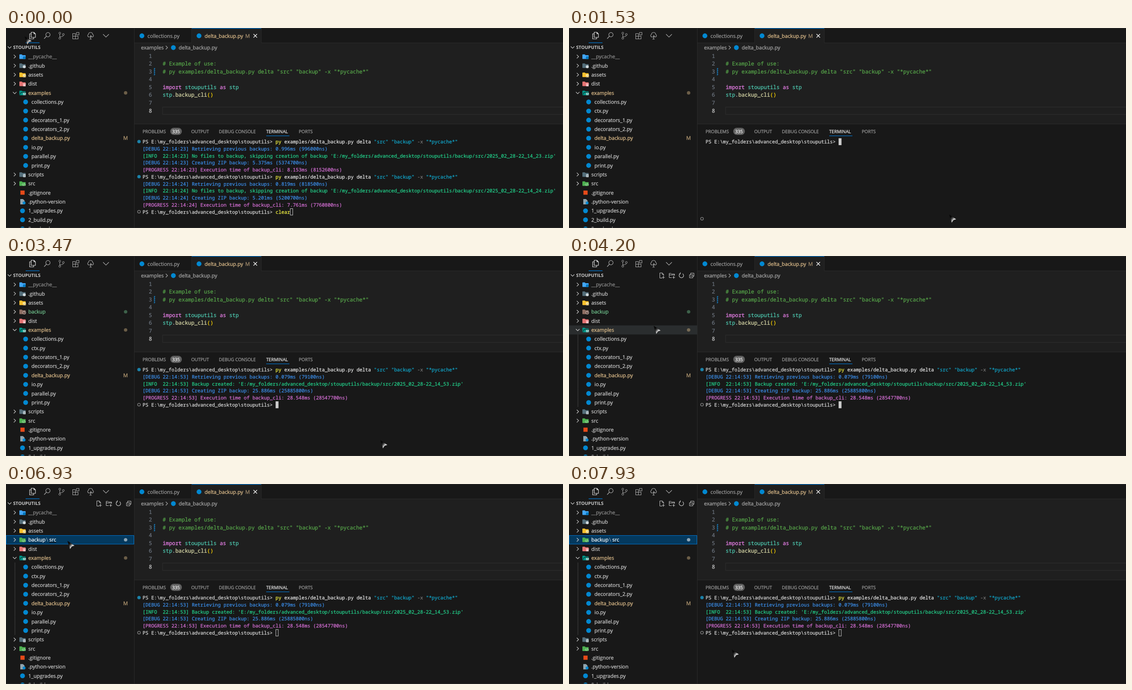
An HTML page for the animation above (8 s loop, 1248x449 px).

```html
<!DOCTYPE html>
<html lang="en">
<head>
<meta charset="utf-8">
<title>Delta backup demo</title>
<style>
  html, body { margin: 0; width: 100%; height: 100%; overflow: hidden; background: #181818; }
  svg { display: block; width: 1248px; height: 449px; }
  text { white-space: pre; text-rendering: geometricPrecision; }
  /* A hairline outline gives the small type its firm screen weight. */
  tspan { fill: currentColor; stroke: currentColor; stroke-width: .28px; }
  .ui { font: 11.43px "Open Sans", "Noto Sans", sans-serif; }
  .cap { font: 10.1px "Open Sans", "Noto Sans", sans-serif; }
  .bold { font-weight: 700; }
  .bold tspan { stroke: none; }
  .code { font: 11.85px "Noto Sans Mono", "DejaVu Sans Mono", monospace; }
  .term { font: 10.8px "Noto Sans Mono", "DejaVu Sans Mono", monospace; }
</style>
</head>
<body>
<svg viewBox="0 0 1248 449" xmlns="http://www.w3.org/2000/svg">
  <defs>
    <linearGradient id="arrow" x1="0" y1="0" x2="1" y2="1">
      <stop offset=".25" stop-color="#060606"/>
      <stop offset=".42" stop-color="#3a3a3a"/>
      <stop offset=".62" stop-color="#d8d8d8"/>
    </linearGradient>
  </defs>
  <g id="frame"></g>
  <g id="tree"></g>
  <g id="terminal"></g>
  <path id="mouse" d="M0 0L16 10.5L9.500 12.500L5.500 18.500Z" fill="url(#arrow)" stroke="#0c0c0c" stroke-width=".5"/>
</svg>
<script>
const LOOP = 8000, FPS = 15;
const ROW_H = 20.36, LINE_H = 15.75, COL_W = 6.48;
const GOLD = '#e2c08d', GREEN = '#73c991', GREY = '#9d9d9d', LIGHT = '#cccccc', LINE = '#2b2b2b', ACCENT = '#0078d4';
const el = id => document.getElementById(id);

// Drawing helpers
const rect = (x, y, w, h, fill, more = '') => `<rect x="${x}" y="${y}" width="${w}" height="${h}" fill="${fill}" ${more}/>`;
const circle = (x, y, r, fill, more = '') => `<circle cx="${x}" cy="${y}" r="${r}" fill="${fill}" ${more}/>`;
const stroke = (d, color, width = 1) => `<path d="${d}" fill="none" stroke="${color}" stroke-width="${width}"/>`;
const spans = parts => parts.map(([s, color]) => `<tspan color="${color}">${s.replace(/>/g, '&gt;')}</tspan>`).join('');
const text = (cls, x, cy, parts, more = '') =>
  `<text class="${cls}" x="${x}" y="${cy + 4}" ${more}>${spans(parts)}</text>`;
const ui = (x, cy, s, color, more) => text('ui', x, cy, [[s, color]], more);
const chevron = (x, y, open, color = LIGHT) =>
  stroke(open ? `M${x - 4} ${y - 2}l4 4l4 -4` : `M${x - 2} ${y - 4}l4 4l-4 4`, color, 1.2);

// File icons
const pyIcon = (x, y) => circle(x, y, 5.4, '#0288d1');
const folder = (y, color, badge = '') =>
  `<path d="M31 ${y - 5}h4.5l1.5 1.7h6q1 0 1 1v6.6q0 1-1 1h-12q-1 0-1-1v-8.3q0-1 1-1z" fill="${color}"/>` + badge;
const ICONS = {
  py: pyIcon,
  cache: (x, y) => folder(y, '#42a5f5', circle(41, y + 2.5, 3.2, '#0277bd')),
  hub: (x, y) => folder(y, '#546e7a', circle(41, y + 2.5, 3.3, '#cfd8dc')),
  assets: (x, y) => folder(y, '#fbc02d', rect(38, y - .5, 6.5, 6, '#fff3c4') + stroke(`M38.5 ${y + 5}l2 -3l1.5 1.5l1 -1l1.5 2.5`, '#c68a00')),
  backup: (x, y) => folder(y, '#8d6e63', circle(41, y + 2, 3.3, '#5d4037', 'stroke="#d7ccc8"') + stroke(`M41 ${y}v2h1.5`, '#d7ccc8')),
  dist: (x, y) => folder(y, '#e57373', rect(38, y - .5, 6.5, 1.8, '#ffcdd2') + rect(38.5, y + 2, 5.5, 3.5, '#ffcdd2')),
  examples: (x, y) => folder(y, '#009688', stroke(`M31 ${y + 4.5}l2.5 -5.5h10`, '#181818') + rect(38, y, 6.5, 5, '#b2dfdb') + stroke(`M39 ${y + 4}l2 -2.5l2.5 2.5`, '#00796b')),
  scripts: (x, y) => folder(y, '#546e7a', rect(38.5, y - .5, 5.5, 6.5, '#cfd8dc') + stroke(`M40 ${y + 2}h2.5m-2.5 2h2.5`, '#546e7a')),
  src: (x, y) => folder(y, '#4caf50', stroke(`M38 ${y}l-2 2.3l2 2.3m4 -4.6l2 2.3l-2 2.3m-1.2 -5l-1.6 5.5`, '#c8e6c9')),
  git: (x, y) => rect(x - 4.7, y - 4.7, 9.4, 9.4, '#e64a19'),
  version: (x, y) => `<path d="M32 ${y - 6}h6l3.5 3.5v8.5h-9.5z" fill="#90a4ae"/>` + circle(40.5, y + 2.7, 3.2, '#0288d1'),
  zip: (x, y) => rect(x - 5, y - 6, 10.5, 12, '#afb42b', 'rx="1"') + stroke(`M${x + .5} ${y - 5}v10`, '#4b4d10', 1.5)
};

function drawFrame() {
  const icon = '#a8a8a8', teal = '#4ec9b0', comment = '#57a64a', magenta = '#ee82ee';
  const numbers = Array.from({ length: 8 }, (_, i) =>
    text('code', 327, 62.5 + 17.58 * i, [[String(i + 1), i === 7 ? LIGHT : '#6e7681']], 'text-anchor="end"'));
  const code = (line, ...parts) => text('code', 351, 62.5 + 17.58 * (line - 1), parts);
  el('frame').innerHTML = [
    rect(0, 0, 1248, 449, '#181818'), rect(288, 34, 960, 181, '#1f1f1f'),
    rect(0, 0, 1248, 1, LINE), rect(287, 0, 1, 449, LINE),
    rect(288, 33, 960, 1, LINE), rect(416, 0, 156, 34, '#1f1f1f'),
    rect(415.5, 0, 1, 33, LINE), rect(571.5, 0, 1, 33, LINE), rect(416, 0, 156, 1.3, ACCENT),
    // Side bar views
    stroke('M56.5 9.5h6l3.5 3.5v8h-9.5zM62.5 9.5v3.5h3.5M56.5 13h-3.5v11.5h9v-3.5', '#e0e0e0', 1.2),
    circle(94, 15, 4.8, 'none', `stroke="${icon}" stroke-width="1.2"`), stroke('M90.5 18.5l-5 5.5', icon, 1.3),
    circle(120.5, 11.5, 2.1, 'none', `stroke="${icon}"`), circle(128.5, 14.5, 2.1, 'none', `stroke="${icon}"`),
    circle(120.5, 23, 2.1, 'none', `stroke="${icon}"`), stroke('M120.5 13.6v7.3M128.5 16.6q0 2.7-4 2.7q-4 0-4 2', icon),
    stroke('M149.5 12.5h6v12h-6zM149.5 18.5h12v6h-12M158 10h5.5v5.5h-5.5z', icon, 1.1),
    stroke('M187 20q-4 .5-4-3q0-2 2-3q0-4 4.5-4t4.5 4q2 1 2 3q0 3.5-4 3zM189.5 25v-9m0 4l2.5-2.5m-5 7.5h5', icon, 1.2),
    stroke('M217.5 14l6.5 6.5l6.5-6.5', icon, 1.2), rect(44, 32.5, 31, 1.3, ACCENT),
    chevron(8, 43.5, true), text('cap bold', 16, 43.3, [['STOUPUTILS', LIGHT]]),
    // Editor tabs and path
    pyIcon(304.5, 17.5), ui(317, 17.5, 'collections.py', GREY),
    pyIcon(432.5, 17.5), ui(445, 17.5, 'delta_backup.py', GOLD), ui(536, 17.5, 'M', '#a89170'),
    stroke('M554.5 13.5l8 8m0-8l-8 8', '#fff', 1.3),
    ui(302.5, 44, 'examples', '#a9a9a9'), chevron(360, 44, false, '#a9a9a9'),
    pyIcon(375, 44), ui(387, 44, 'delta_backup.py', '#a9a9a9'),
    // Code
    rect(351, 177.5, 900, 16.5, 'none', 'stroke="#303030"'), ...numbers,
    rect(331.5, 89.5, 2.5, 17, '#163f5c'),
    ...[0, 1, 2, 3].map(i => stroke(`M331.5 ${93 + i * 4.2}l2.5 -2.5`, '#2090d3', 1.3)),
    code(2, ['# Example of use:', comment]),
    code(3, ['# py examples/delta_backup.py delta "src" "backup" -x "*pycache*"', comment]),
    code(5, ['import', magenta], [' stouputils ', teal], ['as', magenta], [' stp', teal]),
    code(6, ['stp', teal], ['.', LIGHT], ['backup_cli', '#dcdcaa'], ['()', '#ffd700']),
    // Panel
    rect(288, 215, 960, 1, LINE),
    ...[[306, 'PROBLEMS'], [415, 'OUTPUT'], [477, 'DEBUG CONSOLE'], [583, 'TERMINAL'], [656, 'PORTS']]
      .map(([x, s]) => text('cap', x, 232, [[s, s === 'TERMINAL' ? '#e7e7e7' : GREY]])),
    rect(368, 224, 26, 16, '#616161', 'rx="8"'),
    text('cap', 381, 232, [['335', '#f8f8f8']], 'text-anchor="middle"'),
    rect(583, 241.5, 52, 1.2, ACCENT), rect(0, 448, 1248, 1, LINE)
  ].join('');
}

// Explorer
const dir = (name, icon, more) => ({ name, icon, dir: true, ...more });
const child = (name, more) => ({ name, icon: 'py', depth: 1, ...more });

function treeRows(tick) {
  const rows = [dir('__pycache__', 'cache', { color: '#8c8c8c' }), dir('.github', 'hub'), dir('assets', 'assets')];
  const loaded = tick >= 70, open = loaded && tick < 104;
  if (tick >= 50) rows.push(dir('backup', loaded ? 'src' : 'backup',
    { color: GREEN, dot: GREEN, open, compact: loaded, selected: tick >= 68 }));
  if (open) rows.push({ name: '2025_02_28-22_14_53.zip', icon: 'zip', depth: 1, color: GREEN, mark: 'U' });
  rows.push(dir('dist', 'dist'), dir('examples', 'examples', { color: GOLD, dot: GOLD, open: true }));
  for (const name of ['collections', 'ctx', 'decorators_1', 'decorators_2', 'delta_backup', 'io', 'parallel', 'print'])
    rows.push(child(name + '.py', name === 'delta_backup' ? { color: GOLD, mark: 'M' } : {}));
  rows.push(dir('scripts', 'scripts'), dir('src', 'src'),
    { name: '.gitignore', icon: 'git' }, { name: '.python-version', icon: 'version' });
  for (const name of ['1_upgrades', '2_build', '3_upload']) rows.push({ name: name + '.py', icon: 'py' });
  return rows;
}

function drawRow(row, i, hovered, guides) {
  const cy = 64.2 + ROW_H * i, top = cy - ROW_H / 2;
  const color = row.selected ? '#fff' : row.color || LIGHT;
  let out = '';
  if (row.selected) out += rect(.5, top + .5, 286, ROW_H - 1, '#04395e', `stroke="${ACCENT}"`);
  else if (hovered) out += rect(0, top, 287, ROW_H, '#2a2d2e');
  if (row.dir) out += chevron(19.5, cy, row.open);
  if (row.depth && guides) out += rect(19.5, top, 1, ROW_H, '#454545');
  out += ICONS[row.icon](row.depth ? 44 : 37, cy);
  out += ui(row.depth ? 57 : 50, cy, row.name, color);
  if (row.compact) out += ui(90, cy, '\\', '#8fa5b5') + ui(97, cy, 'src', '#fff', 'text-decoration="underline"');
  if (row.dot) out += circle(268, cy, 3.8, row.selected ? '#fff' : row.dot, `opacity="${row.selected ? .55 : .42}"`);
  if (row.mark) out += ui(268, cy, row.mark, row.color, 'text-anchor="middle" opacity=".8"');
  return out;
}

const headerActions = [
  stroke('M209 49.5h-5.5v-11.5h5.5l3 3v3.5M209 38v3.5h3M211.5 45v6m-3-3h6', LIGHT),
  stroke('M230 48.5h-5.5v-9.5h4l1.5 1.5h6.5v3.5M224.5 42.5h12M234.5 45v6m-3-3h6', LIGHT),
  stroke('M249.5 39.5a5 5 0 1 0 5 .2M249.5 36.8v3.2h-3', LIGHT, 1.2),
  stroke('M270 42h7.5v7h-7.5zM272.5 42v-3.5h7.5v7h-2.5M272 45.5h3.5', LIGHT)
].join('');

function drawTree(tick, [x, y]) {
  const focused = tick >= 68, inside = x < 287 && y > 34, active = focused || inside;
  const hover = inside ? Math.floor((y - 54) / ROW_H) : -1;
  el('tree').innerHTML = (active ? headerActions : '') +
    treeRows(tick).map((row, i) => drawRow(row, i, i === hover, active)).join('') + rect(0, 448, 287, 1, LINE);
}

// Terminal
const PROMPT = 'PS E:\\my_folders\\advanced_desktop\\stouputils> ';
const BLUE = '#3b8eea', CYAN = '#11a8cd', YELLOW = '#f5f543';
const CLEAR = [['clear', YELLOW]];
const COMMAND = [['py', YELLOW], [' examples/delta_backup.py delta ', '#e5e5e5'], ['"src" "backup"', CYAN],
  [' -x ', '#767676'], ['"*pycache*"', CYAN]];
const lineY = row => 255 + LINE_H * row;
const termLine = (row, parts) => text('term', 306, lineY(row), parts);
const prompt = (row, parts) => termLine(row, [[PROMPT, '#d8d8d8'], ...parts]);
const done = row => circle(298, lineY(row), 3.8, '#1b81a8');
const pending = row => circle(298, lineY(row), 3.1, 'none', 'stroke="#868686" stroke-width="1.3"');
const size = parts => parts.reduce((n, [s]) => n + s.length, 0);

function caret(row, col, hollow) {
  const x = 306 + COL_W * col, y = lineY(row) - 7.5;
  return hollow ? rect(x + .5, y + .5, COL_W - 1, 14.5, 'none', 'stroke="#ccc"') : rect(x, y, COL_W, 15.5, LIGHT);
}

function run(row, second, previous, info, zip, total) {
  const stamp = `22:14:${second}] `;
  const path = `'E:/my_folders/advanced_desktop/stouputils/backup/src/2025_02_28-22_14_${second}.zip'`;
  return done(row) + prompt(row, COMMAND) + [
    [`[DEBUG ${stamp}Retrieving previous backups: ${previous}`, BLUE],
    [`[INFO  ${stamp}${info} ${path}`, '#23d18b'],
    [`[DEBUG ${stamp}Creating ZIP backup: ${zip}`, BLUE],
    [`[PROGRESS ${stamp}Execution time of backup_cli: ${total}`, '#d670d6']
  ].map((line, i) => termLine(row + 1 + i, [line])).join('');
}

const SKIPPED = 'No files to backup, skipping creation of backup';
const history = run(0, 23, '0.996ms (996000ns)', SKIPPED, '5.375ms (5374700ns)', '8.153ms (8152600ns)') +
  run(5, 24, '0.819ms (818500ns)', SKIPPED, '5.201ms (5200700ns)', '7.761ms (7760800ns)') + prompt(10, CLEAR);
const result = run(0, 53, '0.079ms (79100ns)', 'Backup created:', '25.886ms (25885800ns)', '28.548ms (28547700ns)');

function drawTerminal(tick) {
  const start = PROMPT.length;
  let out;
  if (tick < 22) out = history + pending(10) + caret(10, start + 5, tick < 12);
  else if (tick < 23) out = history + pending(11) + caret(11, 0);
  else if (tick < 42) {
    const typed = tick < 28 ? [] : tick < 30 ? CLEAR : COMMAND;
    out = prompt(0, typed) + pending(11) + (tick < 36 ? caret(0, start + size(typed)) : caret(1, 0));
  } else out = result + prompt(5, []) + pending(5) + caret(5, start, tick >= 68);
  el('terminal').innerHTML = out;
}

// Pointer stops: tick, x, y
const STOPS = [[0, 42, 19], [11, 852, 419], [51, 852, 419], [63, 190, 157], [64, 174, 149], [66, 138, 128],
  [105, 138, 128], [113, 215, 363], [116, 215, 363], [117, 262, 381], [118, 325, 392], [119, 365, 372]];

function pointer(tick) {
  const next = STOPS.findIndex(s => s[0] > tick);
  if (next < 0) return STOPS[STOPS.length - 1].slice(1);
  const [t0, x0, y0] = STOPS[next - 1], [t1, x1, y1] = STOPS[next];
  const k = (tick - t0) / (t1 - t0), e = k * k * (3 - 2 * k);
  return [x0 + (x1 - x0) * e, y0 + (y1 - y0) * e];
}

let shown = -1;
function update(ms) {
  const tick = Math.min(119, Math.floor((ms % LOOP) * FPS / 1000 + .1));
  if (tick === shown) return;
  shown = tick;
  const at = pointer(tick);
  drawTree(tick, at);
  drawTerminal(tick);
  el('mouse').setAttribute('transform', `translate(${at[0].toFixed(2)} ${at[1].toFixed(2)})`);
}

drawFrame();
update(0);
const began = performance.now();
(function loop() {
  update(performance.now() - began);
  requestAnimationFrame(loop);
})();
</script>
</body>
</html>
```
